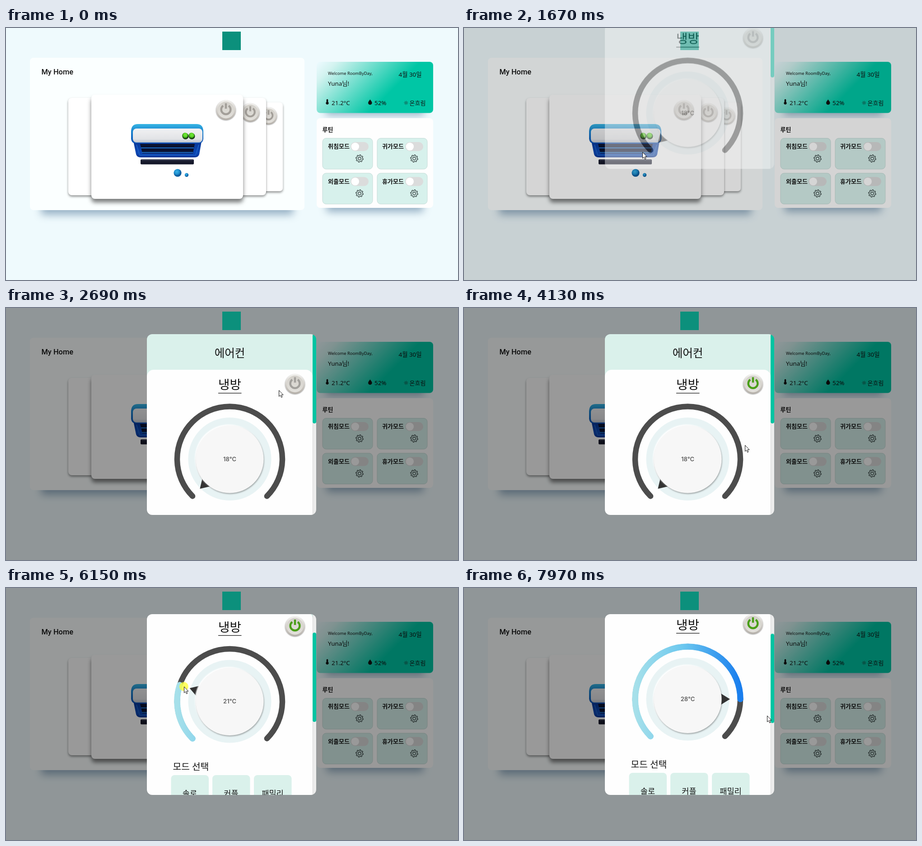
An HTML page for the animation above (8 s loop, 1001x559 px).

```html
<!DOCTYPE html>
<html lang="ko">
<head>
<meta charset="utf-8">
<title>Smart home</title>
<style>
@property --p { syntax: '<number>'; inherits: true; initial-value: 0; }
@property --x { syntax: '<length>'; inherits: true; initial-value: 0px; }
@property --y { syntax: '<length>'; inherits: true; initial-value: 0px; }
@property --r { syntax: '<length>'; inherits: true; initial-value: 0px; }

html, body { margin: 0; width: 100%; height: 100%; overflow: hidden; background: #effafd; }
#stage {
  display: block; width: 1001px; height: 559px;
  font: 400 13.4px "Noto Sans", "Noto Sans CJK KR", "Noto Sans CJK JP", sans-serif;
  --a: calc(var(--p) * 270deg - 135deg);
}
#stage, .anim { animation: 8s linear infinite; }
#stage { animation-name: turn; }
text { fill: #111; }
.mid { text-anchor: middle; }
.bold { font-weight: 600; font-size: 13px; }
.soft { filter: blur(9px); fill: #5b7f9f; opacity: .6; }
.side { fill: #fff; filter: drop-shadow(0 3px 2.5px rgba(0,0,0,.42)); }
.front { fill: #fff; filter: drop-shadow(0 8px 5px rgba(0,0,0,.5)); }
.off { color: #a39f99; }

#shade { animation-name: dim; }
#modal { animation-name: drop; }
#content { animation-name: scroll; }
#thumb { animation-name: thumb; }
#power { animation-name: light; }
#cursor { animation-name: move, show; animation-timing-function: linear, step-end;
  transform: translate(calc(var(--x) + var(--r) * sin(var(--a))), calc(var(--y) - var(--r) * cos(var(--a)))); }
#press { animation-name: press; animation-timing-function: step-end; }
#fill { stroke-dasharray: 270px 400px; stroke-dashoffset: calc(270px * (1 - var(--p))); opacity: calc(var(--p) * 999); }
#needle { transform: translate(495.5px, 335px) rotate(var(--a)); }
#knob { filter: drop-shadow(1.5px 2px 1.5px rgba(0,0,0,.32)) drop-shadow(-1.5px -1.5px 1px #fff); }

@keyframes turn {
  0%, 73.125% { --p: 0; }
  82.875% { --p: .607; }
  86.25% { --p: .82; }
  88%, 100% { --p: .83333; }
}
@keyframes dim {
  0%, 19.625% { opacity: 0; animation-timing-function: ease; }
  24.625%, 100% { opacity: .4; }
}
@keyframes drop {
  0%, 19.625% { opacity: 0; transform: translateY(-250px); animation-timing-function: ease; }
  24.625%, 100% { opacity: 1; transform: none; }
}
@keyframes scroll {
  0%, 62.875% { transform: translateY(0); }
  65% { transform: translateY(-73.5px); animation-timing-function: ease-out; }
  66.4%, 99.25% { transform: translateY(-83.5px); }
  99.6%, 100% { transform: translateY(-88.5px); }
}
@keyframes thumb {
  0%, 62.875% { transform: translateY(0); }
  65% { transform: translateY(32px); animation-timing-function: ease-out; }
  66.4%, 99.25% { transform: translateY(41px); }
  99.6%, 100% { transform: translateY(43.5px); }
}
@keyframes light {
  0%, 42.3% { color: #a3a19d; }
  45.8%, 100% { color: #4a9e18; }
}
@keyframes move {
  0%, 8.1% { --x: 895px; --y: 539px; --r: 0px; animation-timing-function: ease-out; }
  11.7% { --x: 389px; --y: 276px; }
  12.6%, 24.5% { --x: 395px; --y: 275px; animation-timing-function: ease-in-out; }
  28.4% { --x: 584px; --y: 190px; }
  29.3%, 30.8% { --x: 585px; --y: 189px; animation-timing-function: ease-in-out; }
  38%, 48.7% { --x: 644px; --y: 168px; animation-timing-function: ease-in-out; }
  51.6%, 66.75% { --x: 622px; --y: 304px; animation-timing-function: ease-in-out; }
  72.75%, 73.12% { --x: 420px; --y: 327.5px; --r: 0px; }
  73.125%, 91.74% { --x: 495.5px; --y: 252px; --r: 107px; }
  91.745% { --x: 602.5px; --y: 252px; --r: 0px; animation-timing-function: ease-out; }
  94.7%, 100% { --x: 671px; --y: 283px; --r: 0px; }
}
@keyframes show { 0% { opacity: 0; } 8.12%, 100% { opacity: 1; } }
@keyframes press {
  0%, 20%, 42.3%, 90.4%, 100% { opacity: 0; }
  19.1%, 41.4%, 73.1% { opacity: .75; }
}
</style>
</head>
<body>
<svg id="stage" viewBox="0 0 1001 559">
  <defs>
    <linearGradient id="metal" x2="0" y2="1"><stop stop-color="#f3f2ef"/><stop offset="1" stop-color="#b5b0a9"/></linearGradient>
    <linearGradient id="face" x2="0" y2="1"><stop stop-color="#d3d0ca"/><stop offset="1" stop-color="#e2e0db"/></linearGradient>
    <linearGradient id="cool"><stop stop-color="#a6e0ea"/><stop offset=".45" stop-color="#6cc8ef"/><stop offset="1" stop-color="#197eee"/></linearGradient>
    <linearGradient id="mint" gradientUnits="userSpaceOnUse" x1="724.5" y1="39" x2="909.5" y2="224">
      <stop stop-color="#eefaff"/><stop offset=".12" stop-color="#d3f3f0"/><stop offset=".62" stop-color="#00c6a5"/>
    </linearGradient>
    <linearGradient id="shell" x2="0" y2="1"><stop stop-color="#38b6e4"/><stop offset=".35" stop-color="#1a86d0"/><stop offset="1" stop-color="#0a4fb4"/></linearGradient>
    <linearGradient id="base" x2="0" y2="1"><stop stop-color="#06308c"/><stop offset=".75" stop-color="#0c48b4"/><stop offset="1" stop-color="#0a3596"/></linearGradient>
    <linearGradient id="panel" x2="0" y2="1"><stop stop-color="#f1f1f3"/><stop offset=".75" stop-color="#e2e3e6"/><stop offset="1" stop-color="#bcc2cc"/></linearGradient>
    <radialGradient id="ball" cx=".4" cy=".35"><stop stop-color="#3cb4e8"/><stop offset=".7" stop-color="#1c8bcb"/><stop offset="1" stop-color="#0f5d9e"/></radialGradient>
    <radialGradient id="lamp" cx=".55" cy=".4"><stop stop-color="#74ea3c"/><stop offset=".75" stop-color="#55cf22"/><stop offset="1" stop-color="#2c7a16"/></radialGradient>
    <clipPath id="frame"><rect x="312" y="58" width="375" height="401" rx="12"/></clipPath>

    <g id="btn">
      <circle r="22" fill="url(#metal)" style="filter:drop-shadow(0 1px 1px rgba(0,0,0,.4))"/>
      <circle r="18.5" fill="url(#face)"/>
      <path d="M-6 -9.6A10.4 10.4 0 1 0 6 -9.6M0 -15V-3" fill="none" stroke="currentColor" stroke-width="4.4"/>
    </g>
    <g id="gear" fill="none" stroke="#1c2626" stroke-width="1.1"><path id="teeth"/><circle r="3.1"/></g>
    <g id="tile">
      <rect x=".5" y=".5" width="111" height="68.5" rx="8" fill="#d7f1ec" stroke="#c6dcd8"/>
      <rect x="62.5" y="9" width="40" height="20" rx="10" fill="#dbdcdc"/>
      <circle cx="72.8" cy="19" r="8.7" fill="#fff"/>
      <use href="#gear" x="82.5" y="45.5"/>
    </g>
  </defs>

  <rect width="1001" height="559" fill="#effafd"/>

  <g id="home">
    <rect class="soft" x="78" y="370" width="558" height="44"/>
    <rect x="53" y="66" width="608" height="338" rx="8" fill="#fbffff"/>
    <text x="78.5" y="102.5" style="font:500 16.4px Roboto,sans-serif">My Home</text>
    <rect class="side" x="326" y="165" width="287" height="197" rx="7"/>
    <use class="off" href="#btn" transform="translate(581.5 195) scale(.86)"/>
    <rect class="side" x="138" y="155" width="438" height="216" rx="8"/>
    <use class="off" href="#btn" transform="translate(541 187.5) scale(.94)"/>
    <rect class="front" x="189" y="148" width="336" height="231" rx="8"/>
    <use class="off" href="#btn" x="487" y="182"/>
  </g>

  <g id="cooler">
    <path d="M281 246H434L428 280Q426 287 418 287H298Q290 287 288 280Z" fill="url(#base)"/>
    <path d="M292 213H422Q436 213 437 228V246Q436 255 428 256H286Q278 255 277 246V228Q278 213 292 213Z" fill="url(#shell)"/>
    <path d="M297 257H418L414 278H302Z" fill="#0a1230"/>
    <path d="M299 266H416M301 276H414" stroke="#1a6cc8" stroke-width="2"/>
    <path d="M289 259L296 282H420L427 259" fill="none" stroke="#1c64cc" stroke-width="1.5"/>
    <rect x="281" y="223" width="154" height="31" rx="8" fill="url(#panel)"/>
    <circle cx="397.5" cy="240" r="7" fill="#173a14"/><circle cx="411.5" cy="240" r="7" fill="#173a14"/>
    <circle cx="396.5" cy="238.5" r="6.3" fill="url(#lamp)"/><circle cx="410.8" cy="238.5" r="6.3" fill="url(#lamp)"/>
    <rect x="298" y="291.5" width="118" height="11" rx="2" fill="#15182a"/>
    <path d="M300 294H414" stroke="#3a3e52" stroke-width="1.5"/>
    <circle cx="380" cy="321.3" r="8.6" fill="url(#ball)"/><circle cx="400" cy="326" r="4.2" fill="url(#ball)"/>
  </g>

  <g id="weather">
    <rect class="soft" x="708" y="165" width="218" height="28" opacity=".5"/>
    <rect x="688" y="75" width="258" height="113.5" rx="8" fill="url(#mint)"/>
    <text x="713" y="103.5" style="font-size:9.4px">Welcome RoomByDay,</text>
    <text x="713" y="128">Yuna님!</text>
    <text x="869.5" y="108">4월 30일</text>
    <text x="721" y="171">21.2°C</text>
    <text x="816" y="171">52%</text>
    <text x="893.5" y="171" style="font-size:13px">온흐림</text>
    <path d="M709.7 159.5a1.8 1.8 0 0 1 3.6 0V164a3.2 3.2 0 1 1 -3.6 0Z" fill="#111"/>
    <path d="M806.3 158.5C808 161 810.6 163.500 810.6 166a4.3 4.3 0 0 1 -8.600 0C802 163.500 804.600 161 806.300 158.500Z" fill="#111"/>
    <g fill="none" stroke="#222" stroke-width=".8">
      <circle cx="886" cy="166" r="1.8"/>
      <circle cx="886" cy="166" r="3.7" pathLength="16" stroke-width="1.3" stroke-dasharray=".6 1.4"/>
    </g>
  </g>

  <g id="routines">
    <rect class="soft" x="710" y="370" width="214" height="38"/>
    <rect x="688" y="200" width="258" height="199" rx="8" fill="#fefefe"/>
    <text class="bold" x="700.5" y="230">루틴</text>
    <use href="#tile" x="700.5" y="244"/><text class="bold" x="713" y="267">취침모드</text>
    <use href="#tile" x="821.5" y="244"/><text class="bold" x="833" y="267">귀가모드</text>
    <use href="#tile" x="700.5" y="321.500"/><text class="bold" x="713" y="345">외출모드</text>
    <use href="#tile" x="821.5" y="321.500"/><text class="bold" x="833" y="345">휴가모드</text>
  </g>

  <rect id="shade" class="anim" width="1001" height="559"/>
  <rect x="479" y="8" width="41" height="41" fill="#0c907c"/>

  <g id="modal" class="anim">
    <g clip-path="url(#frame)">
      <rect x="312" y="58" width="375" height="401" fill="#daf1eb"/>
      <g id="content" class="anim">
        <text class="mid" x="495.5" y="109" style="font-size:24.500px">에어컨</text>
        <rect x="312" y="137" width="367" height="800" rx="15" fill="#fefefe"/>
        <text class="mid" x="495.5" y="180" style="font-size:27.700px">냉방</text>
        <path d="M470 188.800H521.500" stroke="#111" stroke-width="1.2"/>
        <use id="power" class="anim" href="#btn" x="640" y="168.500"/>
        <g fill="none" stroke-linecap="round">
          <path d="M413.100 417.400A116.500 116.500 0 1 1 577.900 417.400" stroke="#4c4c4c" stroke-width="12.500"/>
          <path id="fill" d="M413.100 417.400A116.500 116.500 0 1 1 577.900 417.400" pathLength="270" stroke="url(#cool)" stroke-width="13.500"/>
        </g>
        <circle cx="495.500" cy="335" r="92" fill="#e8f3f4"/>
        <path id="needle" d="M0 -93.500L14.500 -70H-14.500Z" fill="#333"/>
        <circle id="knob" cx="495.500" cy="335.500" r="75" fill="#f7f7f7"/>
        <text id="degree" class="mid" x="495.500" y="339.700" style="font:600 13px Inter,sans-serif;fill:#5e5e5e">18°C</text>
        <text x="369.500" y="487" style="font-size:20.300px">모드 선택</text>
        <g fill="#daf1eb">
          <rect x="365.500" y="498.500" width="83.500" height="84" rx="8"/>
          <rect x="457" y="498.500" width="83.500" height="84" rx="8"/>
          <rect x="549" y="498.500" width="83.500" height="84" rx="8"/>
        </g>
        <g class="mid" style="font-size:17.600px">
          <text x="407" y="545.500">솔로</text><text x="498.500" y="545.500">커플</text><text x="590.500" y="545.500">패밀리</text>
        </g>
      </g>
      <rect x="679" y="58" width="8" height="401" fill="#ececec"/>
      <path d="M679.500 58V459" stroke="#d4d4d4"/>
      <rect id="thumb" class="anim" x="679" y="58" width="8" height="198" rx="4" fill="#00c4a2"/>
    </g>
  </g>

  <g id="cursor" class="anim">
    <circle id="press" class="anim" r="10" fill="#ffff2e"/>
    <path d="M.5 .5V14L3.600 11.200 5.700 16.200 7.900 15.200 5.800 10.400H10Z" fill="#fff" stroke="#111" stroke-linejoin="round"/>
  </g>
</svg>
<script>
const stage = document.getElementById('stage');
const degree = document.getElementById('degree');

// Eight-toothed outline: a circle with a clipped sine on its radius
const outline = Array.from({ length: 96 }, (_, i) => {
  const t = i / 96 * 2 * Math.PI;
  const r = 7.2 + Math.max(-1, Math.min(1, 2 * Math.sin(8 * t)));
  return (r * Math.cos(t)).toFixed(2) + ' ' + (r * Math.sin(t)).toFixed(2);
});
document.getElementById('teeth').setAttribute('d', 'M' + outline.join('L') + 'Z');

function tick() {
  const p = +getComputedStyle(stage).getPropertyValue('--p');
  const label = Math.round(18 + 12 * p) + '°C';
  if (degree.textContent !== label) degree.textContent = label;
  requestAnimationFrame(tick);
}
requestAnimationFrame(tick);
</script>
</body>
</html>
```
